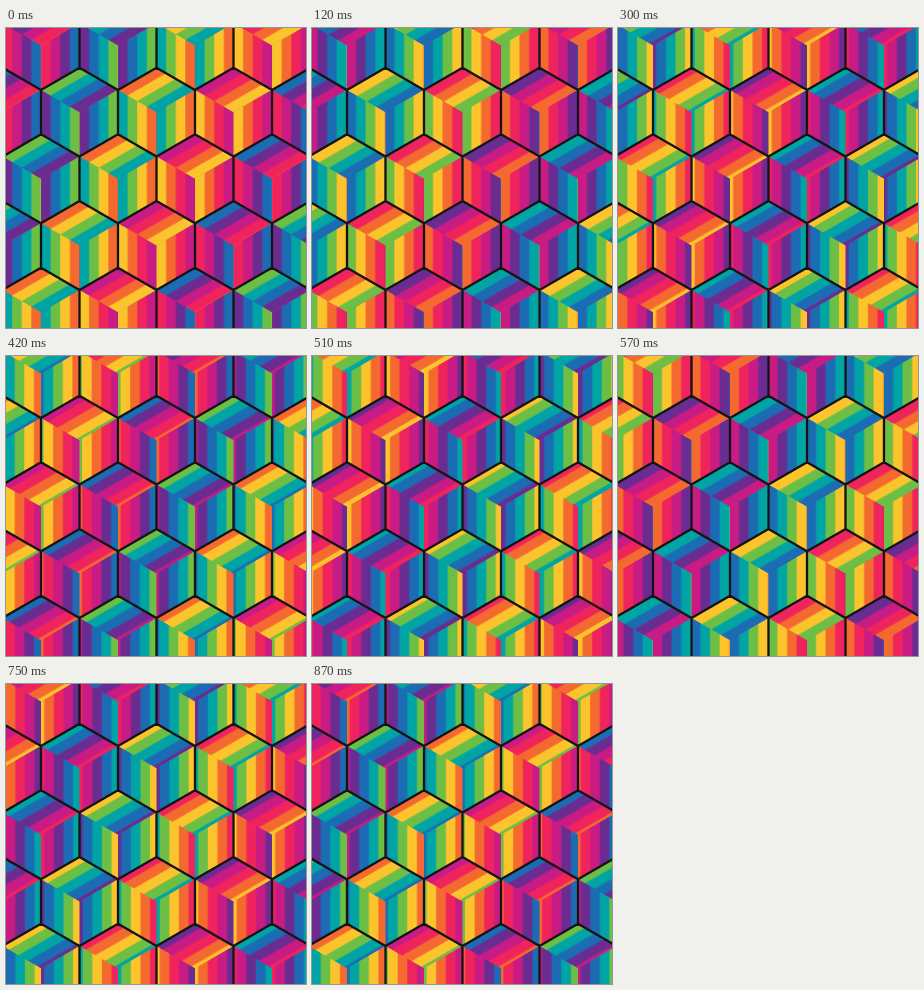
An HTML page for the animation above (900 ms loop, 300x300 px).

```html
<!DOCTYPE html>
<html lang="en">
<head>
<meta charset="utf-8">
<title>Rainbow cubes</title>
<style>
  html, body { margin: 0; width: 100%; height: 100%; overflow: hidden; background: #141414; }
  svg { display: block; width: 300px; height: 300px; }
  .flow { animation: flow 900ms steps(30) infinite; }
  @keyframes flow { to { transform: translateX(-8px); } }
</style>
</head>
<body>
<svg id="stage" viewBox="0 0 300 300">
  <defs>
    <g id="bars"></g>
    <!-- faces measure 4 x 4 bars; slight overlaps hide the seams -->
    <clipPath id="top"><rect x="-.06" y="-.06" width="4.06" height="4.06"/></clipPath>
    <clipPath id="left"><rect width="4.06" height="4"/></clipPath>
    <clipPath id="right"><rect width="4" height="4"/></clipPath>
  </defs>
  <g id="cubes"></g>
  <path id="grid" fill="none" stroke="#141414" stroke-width="2.3" stroke-linejoin="round"/>
</svg>
<script>
  const COLORS = ['#fcc42c', '#f4692f', '#f0245c', '#c81c84',
                  '#6a2c90', '#1c6cb4', '#00a4a4', '#6cbe45'];
  const W = 38.5, SIDE = W * 2 / Math.sqrt(3), H = SIDE / 2;
  const $ = id => document.getElementById(id);

  // Each bar reaches to the end so the next one covers it without a gap.
  const END = 21;
  let bars = '';
  for (let i = -1; i < END; i++) {
    bars += `<rect x="${i}" y="-1" width="${END - i}" height="6" fill="${COLORS[(i + 8) % 8]}"/>`;
  }
  $('bars').innerHTML = bars;

  // A face is spanned by vectors u (across the bars) and v (along them).
  function face(name, phase, u, v, x, y) {
    const m = [...u, ...v].map(n => n / 4).concat(x, y).join(' ');
    return `<g transform="matrix(${m})" clip-path="url(#${name})">
      <g class="flow"><use href="#bars" x="${-phase}"/></g></g>`;
  }

  function cube(x, y, phase) {
    return face('top', phase, [-W, -H], [W, -H], x, y) +
      face('left', phase, [W, H], [0, SIDE], x - W, y - H) +
      face('right', phase, [W, -H], [0, SIDE], x, y);
  }

  let cubes = '', grid = '';
  for (let row = 0; row < 5; row++) {
    for (let col = -1; col < 4; col++) {
      const x = 35 + W * (2 * col + row % 2);
      const y = 150.8 + (row - 2) * SIDE * 1.5;
      const phase = Math.round((x - 112) / W + row + 12) % 8;
      cubes += cube(x, y, phase);
      grid += `M${x} ${y - SIDE}l${W} ${H}v${SIDE}l${-W} ${H}l${-W} ${-H}v${-SIDE}z`;
    }
  }
  $('cubes').innerHTML = cubes;
  $('grid').setAttribute('d', grid);
</script>
</body>
</html>
```
